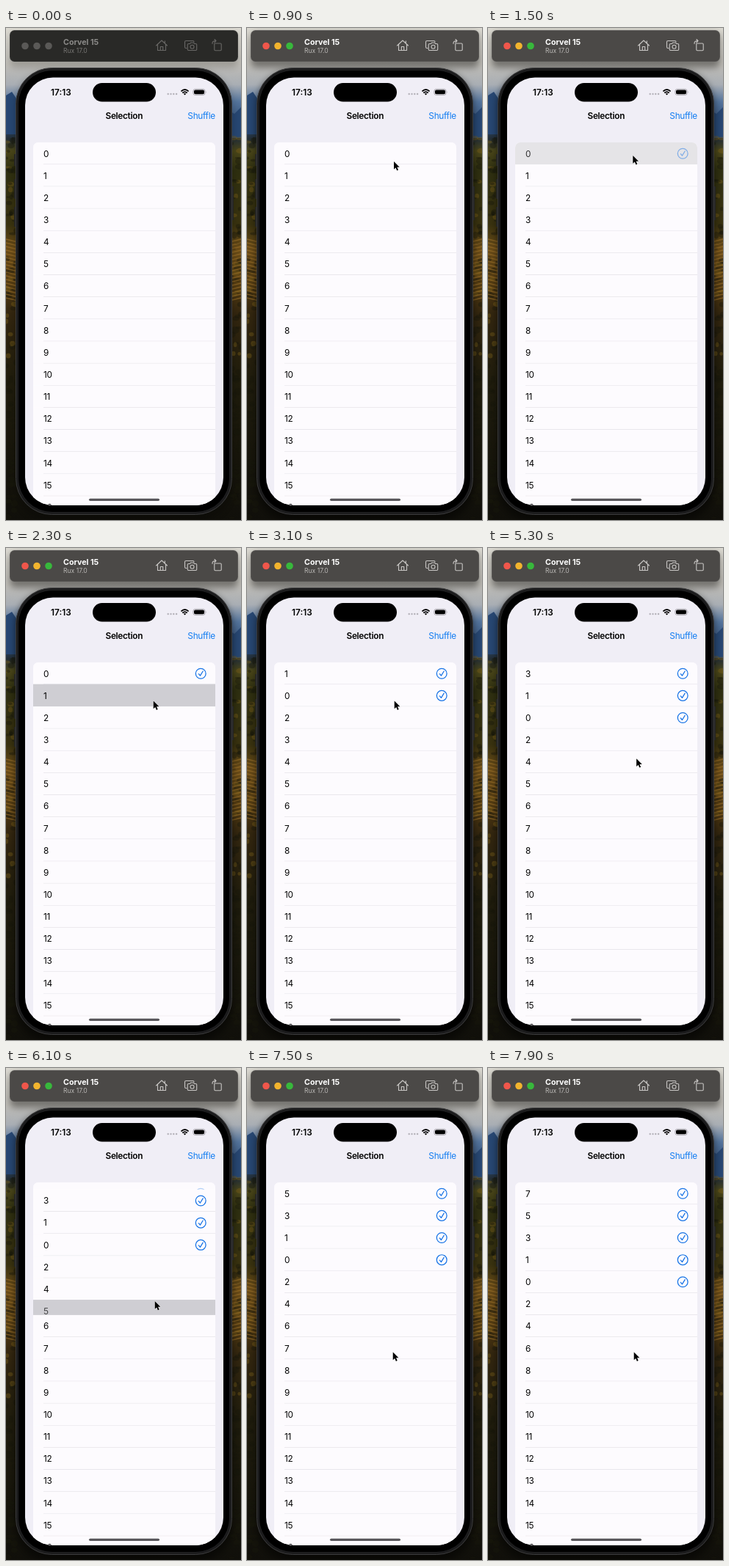
An HTML page that plays this animation: 320x671 px, repeating every 8 s.

```html
<!DOCTYPE html>
<html lang="en">
<head>
<meta charset="utf-8">
<title>Selection</title>
<style>
html, body { margin: 0; width: 100%; height: 100%; overflow: hidden; background: #15140f; }
svg { display: block; width: 320px; height: 671px; }
text { font-family: Inter, Roboto, sans-serif; }
.ui { font-size: 11.8px; letter-spacing: -.3px; }
.bold { font-weight: 600; }
.line { fill: none; stroke-linecap: round; stroke-linejoin: round; }
#bar { fill: #292927; color: #696866; }
#bar.on { fill: #4b4947; color: #c9c7c5; }
#bar .name { fill: #8b8a88; }
#bar.on .name { fill: #fff; }
#bar .os { fill: #777674; }
#bar.on .os { fill: #bab8b6; }
#bar circle { fill: #5a5957; }
#bar.on .r { fill: #f0564b; }
#bar.on .y { fill: #f2b42e; }
#bar.on .g { fill: #38b83c; }
</style>
</head>
<body>
<svg viewBox="0 0 320 671">
  <defs>
    <linearGradient id="land" x1="0" y1="0" x2="0" y2="671" gradientUnits="userSpaceOnUse">
      <stop offset="0" stop-color="#dcdad2"/>
      <stop offset=".075" stop-color="#bebcb6"/>
      <stop offset=".115" stop-color="#a9aeb4"/>
      <stop offset=".15" stop-color="#54749c"/>
      <stop offset=".2" stop-color="#2d4a72"/>
      <stop offset=".225" stop-color="#232e35"/>
      <stop offset=".25" stop-color="#4a4619"/>
      <stop offset=".29" stop-color="#2e2f10"/>
      <stop offset=".4" stop-color="#39320f"/>
      <stop offset=".45" stop-color="#6b4c17"/>
      <stop offset=".53" stop-color="#503911"/>
      <stop offset=".58" stop-color="#33260f"/>
      <stop offset=".72" stop-color="#1f1c0c"/>
      <stop offset="1" stop-color="#100f0a"/>
    </linearGradient>
    <filter id="soft" x="-20%" y="-20%" width="140%" height="140%"><feGaussianBlur stdDeviation="5"/></filter>
    <clipPath id="screen"><rect x="26" y="67.5" width="270" height="583.5" rx="38"/></clipPath>
    <clipPath id="card"><rect x="37" y="156" width="248" height="540" rx="7"/></clipPath>
  </defs>

  <rect width="320" height="671" fill="url(#land)"/>
  <path d="M0 92L8 87L16 99V145H0ZM320 108L311 117L304 113V150H320Z" fill="#274772"/>
  <g id="leaves"></g>
  <g id="shade" filter="url(#soft)">
    <rect x="5" y="6" width="311" height="48" rx="8" opacity=".4"/>
    <rect x="12" y="58" width="297" height="614" rx="48" opacity=".45"/>
  </g>

  <g id="bar">
    <rect x="5" y="3" width="311" height="43" rx="6.5"/>
    <rect x="5.3" y="3.3" width="310.4" height="42.4" rx="6.2" fill="none" stroke="#fff" stroke-opacity=".14" stroke-width=".6"/>
    <circle class="r" cx="26" cy="24.5" r="4.8"/>
    <circle class="y" cx="42" cy="24.5" r="4.8"/>
    <circle class="g" cx="58" cy="24.5" r="4.8"/>
    <text class="name" x="78" y="23" font-size="10.7" font-weight="700">Corvel 15</text>
    <text class="os" x="78" y="34" font-size="8.6">Rux 17.0</text>
    <g class="line" stroke="currentColor" stroke-width="1.1">
      <path d="M204.5 24L212 17L219.500 24M206.500 22.500V30.500H217.500V22.500M210.300 30.500V25.500H213.700V30.500M216.300 20.500V17.700"/>
      <path d="M246 27.500H245Q243.500 27.500 243.500 26V19Q243.500 17.500 245 17.500H254.500Q256 17.500 256 19"/>
      <path d="M248.500 21.500H250.500L251.500 20H255.500L256.500 21.500H258.500Q259.700 21.500 259.700 22.700V29.300Q259.700 30.500 258.500 30.500H248.500Q247.200 30.500 247.200 29.300V22.700Q247.200 21.500 248.500 21.500Z"/>
      <path d="M251 25.800a2.500 2.500 0 1 0 5 0a2.500 2.500 0 1 0-5 0"/>
      <path d="M283.800 21H292Q293.200 21 293.200 22.200V29.500Q293.200 30.700 292 30.700H285Q283.800 30.700 283.800 29.500ZM281 21.500Q280.500 17.500 286 17.500M284 15.500L286 17.500L284 19.500"/>
    </g>
  </g>

  <path d="M12 172V188M12 206V233M12 244V271M309 216V262" stroke="#262625" stroke-width="2"/>
  <rect x="13.500" y="54.500" width="294" height="609" rx="49" fill="#1b1b1c" stroke="#3b3b3c"/>
  <rect x="16.500" y="57.500" width="288" height="603" rx="46.500" stroke="#29292a" stroke-width=".7"/>

  <g clip-path="url(#screen)">
    <rect x="26" y="67" width="270" height="585" fill="#f0eef6"/>
    <rect x="118" y="75" width="86" height="25.500" rx="12.750"/>
    <text class="ui bold" x="61" y="91.700" style="letter-spacing:0">17:13</text>
    <g fill="#b4b2b9"><circle cx="220.700" cy="90" r="1.200"/><circle cx="224.500" cy="90" r="1.200"/><circle cx="228.300" cy="90" r="1.200"/><circle cx="232.100" cy="90" r="1.200"/></g>
    <path class="line" d="M238.400 86.300Q243.500 81.700 248.600 86.300M240.300 88.500Q243.500 85.700 246.700 88.500" stroke="#000" stroke-width="1.700" style="stroke-linecap:butt"/>
    <path d="M241.700 89.700Q243.500 88.300 245.300 89.700L243.500 91.600Z"/>
    <rect x="254.900" y="83.400" width="16.200" height="8" rx="2.600" fill="none" stroke="#98969c" stroke-width=".8"/>
    <rect x="256" y="84.500" width="14" height="5.800" rx="1.700"/>
    <path d="M272 86.200Q273.200 87.400 272 88.600Z" fill="#98969c"/>
    <text class="ui bold" x="160.800" y="123.500" text-anchor="middle">Selection</text>
    <text class="ui" x="284.800" y="123.500" text-anchor="end" fill="#117cf2">Shuffle</text>
    <g clip-path="url(#card)">
      <rect x="37" y="156" width="248" height="500" fill="#fdfbfe"/>
      <g id="list"></g>
    </g>
    <rect x="113" y="641.700" width="96" height="3.300" rx="1.650" fill="#59575b"/>
  </g>
  <path id="cursor" d="M0 0V10.800L2.500 8.500L4.200 12.400L6 11.600L4.300 7.800H7.700Z" stroke="#fff" stroke-width=".9" stroke-linejoin="round" paint-order="stroke"/>
</svg>
<script>
const $ = id => document.getElementById(id);
const LOOP = 8000, TOP = 156, ROW = 30.15, SLIDE = 330;
const START = 100, ACTIVE = 900;
// value tapped, highlight time, time the row begins to move
const taps = [[0, 1250, 1340], [1, 2220, 2340], [3, 4280, 4400], [5, 5870, 5975], [7, 7510, 7560]];
// cursor stops: time, x, y
const stops = [[100, 318, 330], [900, 200, 182], [1200, 197.3, 174], [1950, 197.3, 174],
  [2200, 200.7, 208.500], [3100, 200.7, 208.500], [3600, 202, 236], [3750, 202, 236], [4250, 201.700, 265],
  [4900, 201.700, 265], [5800, 202.700, 318], [6350, 202.700, 318], [7150, 198.700, 387.500], [8000, 198.700, 387.500]];

const ease = x => x * x * (3 - 2 * x);
const clamp = x => Math.max(0, Math.min(1, x));

function row(n, y, checked, o = {}) {
  const { tint = 0, ink = 1, mark = 1 } = o;
  const mid = y + 15.2;
  let s = `<rect x="37" y="${y}" width="248" height="${ROW + .1}" fill="#fdfbfe"/>`;
  if (tint) s += `<rect x="37" y="${y - .5}" width="248" height="${ROW + .5}" fill="#cfced3" opacity="${tint}"/>`;
  else s += `<rect x="51" y="${y + ROW - .6}" width="234" height=".7" fill="#dedce2"/>`;
  s += `<text class="ui" x="51" y="${mid + 4.3}" opacity="${ink}">${n}</text>`;
  if (checked) s += `<g class="line" stroke="#1673e6" stroke-width="1.250" opacity="${mark}" transform="translate(265.200 ${mid})">
    <circle r="6.900"/><path d="M-2.800 .5L-.8 3L3 -3.200"/></g>`;
  return s;
}

function list(t) {
  const order = [...Array(17).keys()], picked = new Set();
  let active = null;
  for (const tap of taps) {
    if (t < tap[1]) break;
    if (t < tap[2] + SLIDE) { active = tap; break; }
    const n = tap[0];
    order.unshift(...order.splice(order.indexOf(n), 1));
    picked.add(n);
  }
  const at = active ? order.indexOf(active[0]) : -1;
  const p = active ? ease(clamp((t - active[2]) / SLIDE)) : 0;
  let s = '';
  // the new row is uncovered as the rows above the tapped one slide down
  if (at > 0 && p) s += row(order[at], TOP, true, { mark: p, ink: p });
  order.forEach((n, i) => {
    const y = TOP + i * ROW;
    if (i !== at) s += row(n, y + (i < at ? p * ROW : 0), picked.has(n));
    else if (at === 0) s += row(n, y, p > 0, { tint: 1 - p, mark: p, ink: 1 - .8 * p * (1 - p) });
    else s += row(n, y + p * ROW, false, { tint: 1, ink: 1 - p });
  });
  return s;
}

function pointer(t) {
  const i = Math.max(1, stops.findIndex(k => k[0] > t));
  const [a, b] = [stops[i - 1], stops[i]];
  const p = ease(clamp((t - a[0]) / (b[0] - a[0])));
  return [a[1] + (b[1] - a[1]) * p, a[2] + (b[2] - a[2]) * p];
}

function scenery() {
  let seed = 7, s = '';
  const rnd = () => (seed = seed * 16807 % 2147483647) / 2147483647;
  for (let i = 0; i < 190; i++) {
    const y = 150 + rnd() * 520, x = rnd() < .5 ? rnd() * 15 : 306 + rnd() * 14;
    const gold = rnd() < .3 && y < 460;
    s += `<ellipse cx="${x}" cy="${y}" rx="${2 + rnd() * 4}" ry="${1 + rnd() * 4}" fill="${gold ? '#7a601b' : '#17180b'}" opacity=".42"/>`;
  }
  for (let y = 288; y < 372; y += 5)
    s += `<path d="M0 ${y}L16 ${y + 4}M304 ${y + 4}L320 ${y}" stroke="#a5772c" stroke-width="1.300" opacity=".55"/>`;
  return s;
}

function frame() {
  const t = performance.now() % LOOP;
  const on = t >= ACTIVE;
  $('bar').classList.toggle('on', on);
  $('shade').setAttribute('opacity', on ? 1 : .45);
  $('list').innerHTML = list(t);
  $('cursor').setAttribute('visibility', t < START ? 'hidden' : 'visible');
  $('cursor').setAttribute('transform', `translate(${pointer(t)})`);
  requestAnimationFrame(frame);
}

$('leaves').innerHTML = scenery();
frame();
</script>
</body>
</html>
```
